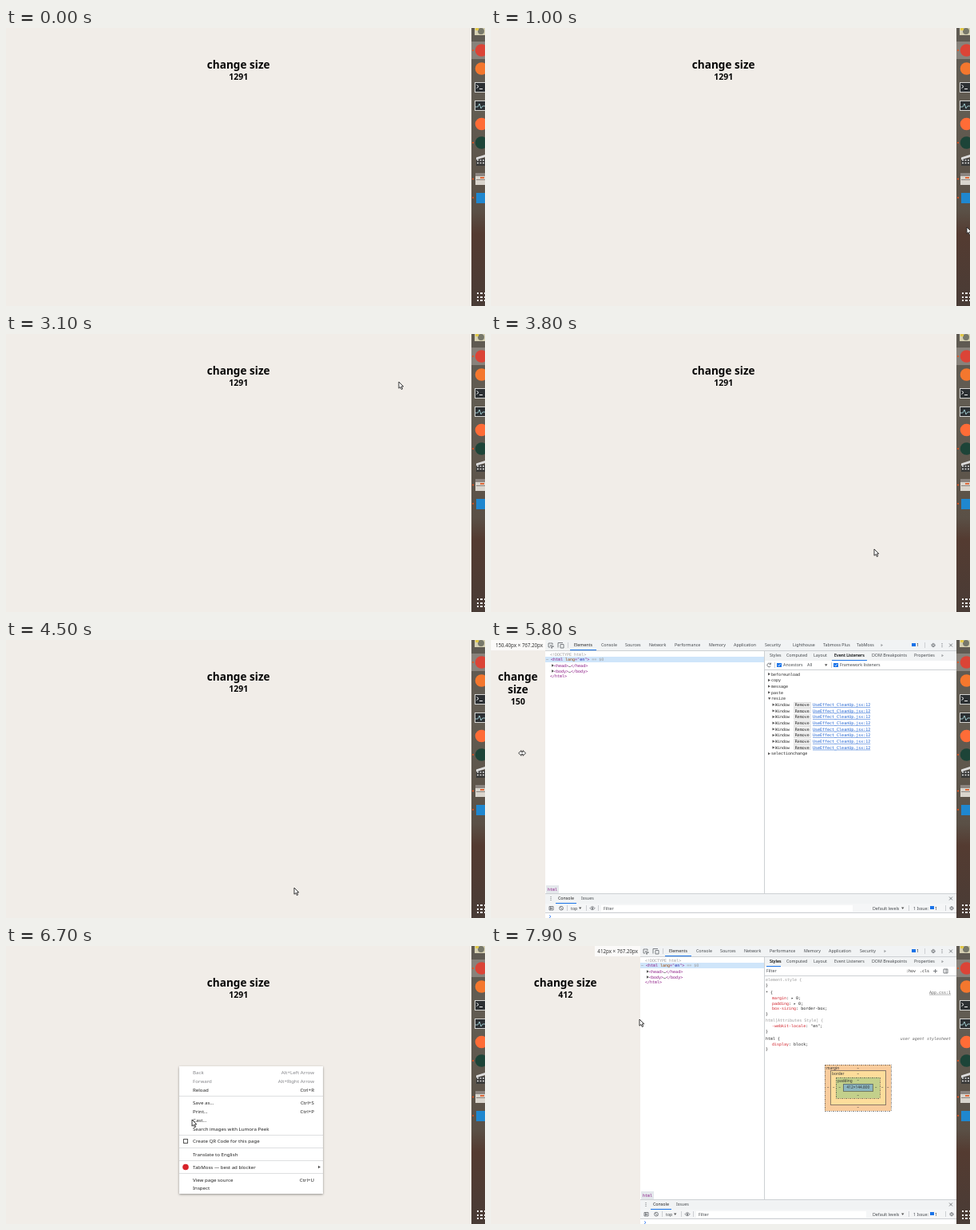
These frames come from a looping animation (600 px wide and 349 px high, 8 s). An HTML page:

```html
<!DOCTYPE html>
<html lang="en">
<head>
<meta charset="utf-8">
<title>change size</title>
<style>
html, body { margin: 0; width: 100%; height: 100%; overflow: hidden; background: #f1ede8; }
svg { display: block; width: 100%; height: 100%; }
text { font: 5.3px "Noto Sans", "Open Sans", sans-serif; fill: #44484c; white-space: pre; }
rect, line { shape-rendering: crispEdges; }
.head { font-size: 13.6px; font-weight: 700; fill: #050505; text-anchor: middle; }
.count { font-size: 10.5px; font-weight: 700; fill: #050505; text-anchor: middle; }
.size { font-size: 6.2px; fill: #333; text-anchor: end; }
.mono, .dim, .link, .agent { font: 5px "DejaVu Sans Mono", monospace; fill: #222; }
.dim { fill: #999; }
.agent { font-style: italic; fill: #666; text-anchor: end; }
.link { fill: #1a5fd0; text-decoration: underline; }
.tag { fill: #881280; }
.attr { fill: #994500; }
.val { fill: #1a1aa6; }
.prop { fill: #d0212a; }
.on { fill: #222; }
.menu { font-size: 6.15px; fill: #222; }
.off { font-size: 6.15px; fill: #85868a; }
.end { text-anchor: end; }
.box { font-size: 4.8px; fill: #333; }
.icon { fill: none; stroke: #5f6368; stroke-width: .8; }
</style>
</head>
<body>
<svg id="stage" viewBox="0 0 600 349" preserveAspectRatio="none"></svg>
<script>
const SCALE = 0.453, RIGHT = 583, FULL = 1291, DOCKED = 412, MIN = 150.4, LOOP = 8000;

// Text is placed by the middle of its capitals.
const txt = (x, y, s, cls = '') => `<text x="${x}" y="${y}" dy=".36em" class="${cls}">${s}</text>`;
const rect = (x, y, w, h, fill, more = '') => `<rect x="${x}" y="${y}" width="${w}" height="${h}" fill="${fill}" ${more}/>`;
const hline = (x, y, w, c = '#cdd0d3') => rect(x, y, w, .6, c);
const vline = (x, y, h, c = '#cdd0d3') => rect(x, y, .6, h, c);
const disc = (x, y, r, fill) => `<circle cx="${x}" cy="${y}" r="${r}" fill="${fill}"/>`;
const path = (d, more = 'class="icon"') => `<path d="${d}" ${more}/>`;
const span = (cls, s) => `<tspan class="${cls}">${s}</tspan>`;
const group = (id, s, more = '') => `<g id="${id}" ${more}>${s}</g>`;
const right = (x, y) => path(`M${x} ${y - 1.7}l3 1.7l-3 1.7z`, 'fill="#555"');
const down = (x, y) => path(`M${x} ${y - 1.2}h3.4l-1.7 2.6z`, 'fill="#555"');
const cross = (x, y) => path(`M${x - 2} ${y - 2}l4 4m0-4l-4 4`);
const dots = (x, y) => [-2, 0, 2].map(d => disc(x, y + d, .6, '#5f6368')).join('');
const gear = (x, y) => `<circle cx="${x}" cy="${y}" r="2.2" class="icon" stroke-dasharray="1.2 .5"/><circle cx="${x}" cy="${y}" r="1.4" class="icon"/>`;
const tick = (x, y) => rect(x - 2.6, y - 2.6, 5.2, 5.2, '#1a73e8', 'rx=".8"') +
  path(`M${x - 1.5} ${y}l1.2 1.3l2-2.7`, 'fill="none" stroke="#fff" stroke-width=".8"');
const bubble = (x, y) => rect(x, y - 2.3, 4.6, 4, '#1a73e8') + txt(x + 6, y, '1', 'on');

const tabs = [
  ['Elements', 36, 59], ['Console', 70, 90], ['Sources', 100, 120], ['Network', 130, 152],
  ['Performance', 162, 195], ['Memory', 205, 225], ['Application', 236, 265], ['Security', 275, 295],
  ['Lighthouse', 310, 338], ['Tabmoss Plus', 348, 380], ['TabMoss', 390, 410]
];

function leftPane() {
  const tag = (s, y) => right(8, y) + txt(11, y, `&lt;${s}&gt;${span('mono', '…')}&lt;/${s}&gt;`, 'mono tag');
  return rect(0, 0, 600, 349, '#fff') +
    rect(0, 0, 600, 13, '#f1f3f4') + hline(0, 13, 600) +
    path('M4 4h5v2M4 4v5h2M6.5 6.5l4 1.6l-1.8.6l-.6 1.8z') +
    path('M16 9.5v-6h6M19 5.5h4v4.5h-4z') + vline(28, 3, 7) +
    tabs.map(([s, x], i) => group('tab' + i, txt(x, 6.5, s, i ? '' : 'on'))).join('') +
    rect(31, 12, 33, 1, '#1a73e8') +
    txt(6, 18, '&lt;!DOCTYPE html&gt;', 'dim') +
    rect(0, 21, 600, 7, '#cfe5fa') + txt(.8, 24.5, '⋯', 'dim') +
    txt(7, 24.5, `&lt;html ${span('attr', 'lang')}="${span('val', 'en')}"&gt;${span('dim', ' == $0')}`, 'mono tag') +
    tag('head', 32) + tag('body', 39) + txt(6, 45.5, '&lt;/html&gt;', 'mono tag') +
    rect(0, 308, 600, 10, '#fff') + hline(0, 307.5, 600) +
    rect(1, 308, 16, 10, '#e4e8ec') + txt(3, 313, 'html', 'mono tag');
}

function drawerLeft() {
  return rect(0, 318, 600, 13, '#f1f3f4') + hline(0, 318, 600) + hline(0, 330.5, 600) +
    rect(0, 331, 600, 11, '#f5f6f7') + hline(0, 342, 600) + rect(0, 342.6, 600, 8, '#fff') +
    dots(7, 324.5) + txt(16, 324.5, 'Console', 'on') + rect(13, 330, 26, 1, '#1a73e8') + txt(45, 324.5, 'Issues') +
    path('M5 334.5h5v4.5h-5zM6.5 335.5l2.3 1.3l-2.3 1.3z') +
    `<circle cx="20" cy="336.7" r="2.4" class="icon"/>` + path('M18.3 335l3.4 3.4') +
    vline(27, 333, 7) + txt(32, 336.7, 'top') + down(42, 336.7) + vline(51, 333, 7) +
    path('M56 336.7q3-4 6 0q-3 4-6 0z') + disc(59, 336.7, 1, '#5f6368') + vline(66, 333, 7) +
    rect(70, 332.5, 315, 8.5, '#fff') + txt(73, 336.7, 'Filter') +
    path('M5 345.5l2 1.7l-2 1.7', 'fill="none" stroke="#367cf1" stroke-width=".9"');
}

function fixedTools() {
  return rect(521, 0, 62, 13, '#f1f3f4') + bubble(527, 6.5) + vline(543, 3, 7) +
    gear(554, 6.5) + dots(565, 6.5) + cross(576, 6.5);
}

function drawerRight() {
  return rect(470, 331.5, 113, 10, '#f5f6f7') + cross(576, 324.5) +
    txt(478, 336.7, 'Default levels') + down(514, 336.7) + vline(523, 333, 7) +
    txt(529, 336.7, '1 Issue:') + bubble(550, 336.7) + vline(569, 333, 7) + gear(577, 336.7);
}

const sideTabs = [['Styles', 349], ['Computed', 370], ['Layout', 404], ['Event Listeners', 430],
  ['DOM Breakpoints', 477], ['Properties', 530], ['»', 564]];

function sidebar() {
  return rect(342, 13.6, 241, 304.4, '#fff') + rect(342, 13.6, 241, 12, '#f1f3f4') +
    hline(342, 25.5, 241) + hline(342, 37, 241) + vline(342, 13.6, 304.4) +
    sideTabs.map(([s, x]) => txt(x, 19.5, s)).join('');
}

function listeners() {
  const rowY = i => 42.8 + 7.68 * i;
  const events = ['beforeunload', 'copy', 'message', 'paste', 'resize'];
  let s = rect(427, 25, 44, 1, '#1a73e8') + txt(430, 19.5, 'Event Listeners', 'on') +
    path('M350 30a2.3 2.3 0 1 0 .3 2.5M350.5 28.5v2h-2') + vline(355, 28, 7) +
    tick(361, 31.5) + txt(366, 31.5, 'Ancestors') + txt(396, 31.5, 'All') + down(418, 31.5) +
    vline(426, 28, 7) + tick(432, 31.5) + txt(437, 31.5, 'Framework listeners');
  events.forEach((e, i) => {
    s += (i === 4 ? down : right)(347, rowY(i)) + txt(351, rowY(i), e, 'mono');
  });
  for (let i = 5; i < 13; i++) {
    const y = rowY(i);
    s += right(352.5, y) + txt(356, y, 'Window', 'mono') +
      rect(379.5, y - 3, 20.5, 6, '#f2f2f2', 'stroke="#ccc" stroke-width=".5"') + txt(380.8, y, 'Remove', 'mono') +
      txt(403, y, 'UseEffect_CleanUp.jsx:12', 'link');
  }
  return s + right(347, rowY(13)) + txt(351, rowY(13), 'selectionchange', 'mono');
}

function styles() {
  const rule = (y, name, value) => txt(352, y, `${span('prop', name)}: ${value};`, 'mono');
  const layer = (x, y, w, h, fill, dash = '') =>
    rect(x, y, w, h, fill, `stroke="#444" stroke-width=".6" stroke-dasharray="${dash}"`);
  const dashes = [[160.5, 202.5], [168, 187]].flat();
  return rect(345, 25, 18, 1, '#1a73e8') + txt(349, 19.5, 'Styles', 'on') +
    txt(345, 31.5, 'Filter') + txt(520, 31.5, ':hov', 'mono') + txt(537, 31.5, '.cls', 'mono') +
    path('M554 31.5h5m-2.5-2.5v5M567 29h5v5h-5zM570 29v5') +
    txt(344, 42, 'element.style {', 'dim') + txt(344, 49, '}', 'mono') + hline(342, 52.5, 241) +
    txt(344, 58, '* {', 'mono') + `<text x="576" y="58" dy=".36em" class="agent" style="font-style:normal;text-decoration:underline">App.css:1</text>` +
    rule(65, 'margin', '▸ 0') + rule(72, 'padding', '▸ 0') + rule(78, 'box-sizing', 'border-box') +
    txt(344, 85, '}', 'mono') + hline(342, 88.5, 241) +
    `<g font-style="italic">${txt(344, 93, 'html[Attributes Style] {', 'dim')}` +
    rule(100, '-webkit-locale', '"en"') + txt(344, 107, '}', 'mono') + '</g>' + hline(342, 110.5, 241) +
    txt(344, 116, 'html {', 'mono') + txt(576, 116, 'user agent stylesheet', 'agent') +
    rule(123, 'display', 'block') + txt(344, 129, '}', 'mono') + hline(342, 133.5, 241) +
    layer(418, 149, 83, 58, '#f9cc9d', '1.5 1') + layer(425, 156.5, 69, 42.5, '#fddd9b') +
    layer(432, 165, 55, 26, '#c3d08b', '1.5 1') + layer(441, 173, 37, 9, '#8cb6c0') +
    txt(420, 153, 'margin', 'box') + txt(427, 160.5, 'border', 'box') + txt(434, 169, 'padding', 'box') +
    dashes.map(y => txt(458.5, y, '–', 'box')).join('') + txt(458.5, 153, '–', 'box') +
    [421, 428, 435.5, 481, 489, 496].map(x => txt(x, 177.5, '–', 'box')).join('') +
    txt(445.5, 177.5, '412×144.800', 'box');
}

function contextMenu() {
  const items = [[8, 'Back', 'Alt+Left Arrow'], [19, 'Forward', 'Alt+Right Arrow'], [30, 'Reload', 'Ctrl+R'],
    [46, 'Save as…', 'Ctrl+S'], [57, 'Print…', 'Ctrl+P'], [67.5, 'Cast…'], [78.5, 'Search images with Lumora Peek'],
    [94, 'Create QR Code for this page'], [110.5, 'Translate to English'], [126.5, 'TabMoss — best ad blocker'],
    [142.5, 'View page source', 'Ctrl+U'], [153, 'Inspect']];
  return rect(0, 0, 180, 159.5, '#fff', 'filter="url(#shade)"') +
    items.map(([y, s, key], i) => txt(17, y, s, i < 2 ? 'off' : 'menu') +
      (key ? txt(169, y, key, 'end ' + (i < 2 ? 'off' : 'menu')) : '')).join('') +
    [37, 86, 102, 118, 134].map(y => hline(0, y, 180, '#dedfe1')).join('') +
    rect(5.5, 91.5, 5, 5, 'none', 'stroke="#555" stroke-width="1"') + disc(8, 126.5, 3.8, '#d8232a') + right(174, 126.5);
}

function dock() {
  const terminal = y => rect(587, y - 6.5, 14, 13, '#d5d5d2') + rect(588.2, y - 5.2, 13, 10.4, '#2c3033');
  const white = 'fill="none" stroke="#eee" stroke-width="1"';
  let s = rect(RIGHT, 0, 17, 349, 'url(#wall)') + rect(RIGHT, 16.5, 17, 22, '#88827b') +
    rect(587, 0, 13, 9, '#d6d0b2') + disc(595, 4, 4, '#77786a') + rect(588, 0, 4, 3, '#e2c94a') +
    disc(595.5, 28, 7.8, '#db4437') + disc(595.5, 51, 7.8, '#f4772e') +
    terminal(74.5) + path('M589.5 71.5l2.5 2l-2.5 2M593 76.5h4', white) +
    terminal(97.5) + path('M588 99h3l2-4l2 6l2-3h4', 'fill="none" stroke="#9bc4c8" stroke-width="1"') +
    disc(595.5, 120.5, 7.8, '#ff6c37') + disc(595.5, 144, 7.8, '#1d4438') +
    rect(589, 164, 12, 9, '#3a3a39') + path('M589 162.5l11-3.5v3l-11 3.5z', 'fill="#ddd"') +
    path('M590 166h10M590 169.5h10', 'stroke="#ddd" stroke-width="1.4" stroke-dasharray="2 1.5"') +
    rect(588, 182, 13, 15, '#d9d5cd') + rect(588, 182, 13, 4, '#8c8580') + rect(589, 190, 12, .8, '#8c8580') + rect(594, 187, 5, 1.5, '#e06a3a') +
    rect(589, 207, 12, 13, '#1f87cf');
  for (const y of [28, 144, 189.5, 213]) s += disc(585, y, 1.1, '#e95420');
  for (let i = 0; i < 9; i++) s += rect(590 + 4.3 * (i % 3), 332 + 4.6 * Math.floor(i / 3), 2.2, 2.2, '#eee');
  return s;
}

const stage = document.getElementById('stage');
stage.innerHTML = `<defs>
  <linearGradient id="wall" x2="0" y2="1"><stop stop-color="#5f5a52"/><stop offset=".3" stop-color="#625c52"/>
  <stop offset=".66" stop-color="#5a5046"/><stop offset=".74" stop-color="#543b31"/><stop offset="1" stop-color="#493c36"/></linearGradient>
  <filter id="shade" x="-5%" y="-5%" width="110%" height="112%"><feDropShadow dx="0" dy="1" stdDeviation="1.6" flood-opacity=".4"/></filter>
  </defs>` + rect(0, 0, 600, 349, '#f1ede8') +
  '<text id="line1" y="51" class="head"></text><text id="line2" y="67" class="head">size</text><text id="count" class="count"></text>' +
  group('tools',
    group('label', rect(-57, 0, 57, 13, '#fbfaf9', 'id="labelBox"') + '<text id="size" x="-3" y="6.5" dy=".36em" class="size"></text>') +
    group('left', leftPane()) + txt(0, 6.5, '»', 'more') + fixedTools() + sidebar() +
    group('listeners', listeners()) + group('styles', styles()) + group('drawer', drawerLeft()) + drawerRight()) +
  group('menu', contextMenu()) + dock() +
  group('cursor',
    path('M0 0v8.2l1.9-1.7l1.4 3l1.4-.6l-1.4-3h2.5z', 'id="arrow" fill="#fff" stroke="#222" stroke-width=".9"') +
    path('M-4.5 0l3.5-3.3v2h2v-2l3.5 3.3l-3.5 3.3v-2h-2v2z', 'id="resizer" fill="#fff" stroke="#222" stroke-width=".9"'));

const el = id => document.getElementById(id);
const show = (id, on) => { el(id).style.display = on ? '' : 'none'; };
const move = (id, x, y = 0) => el(id).setAttribute('transform', `translate(${x} ${y})`);
const more = stage.querySelector('.more');

// Pointer route: time, x, y
const route = [[1000, 596, 250], [1300, 565, 210], [1600, 470, 70], [1900, 340, 215], [2100, 293, 241],
  [2500, 350, 190], [3100, 492, 60], [3500, 570, 195], [3800, 480, 270], [4000, 370, 180], [4200, 305, 100],
  [4400, 325, 305], [4500, 361, 311], [4700, 310, 151], [4900, 340, 303], [5000, 340, 303], [5200, 450, 20],
  [5300, 450, 20], [5500, 187, 142], [5800, 39, 142], [5900, 39, 142], [6200, 187, 142], [6400, 217, 151],
  [6500, 217, 151], [6700, 233, 218], [7000, 245, 303], [7300, 245, 303], [7900, 186, 92]];

function pointer(t) {
  const i = route.findIndex(p => p[0] > t);
  if (i < 0) return route[route.length - 1].slice(1);
  if (!i) return route[0].slice(1);
  const [t0, x0, y0] = route[i - 1], [t1, x1, y1] = route[i];
  const k = (t - t0) / (t1 - t0);
  return [x0 + (x1 - x0) * k, y0 + (y1 - y0) * k];
}

function draw(t) {
  const within = (a, b) => t >= a && t < b;
  const [x, y] = pointer(t);
  const drag = within(5500, 6300);
  const open = within(5000, 6300) || t >= 7100;
  const px = !open ? FULL : drag ? Math.min(DOCKED, Math.max(MIN, Math.round(x / SCALE / .8) * .8)) : DOCKED;
  const edge = open ? Math.round(px * SCALE) : RIGHT;
  const wrap = edge < 84;

  el('line1').textContent = wrap ? 'change' : 'change size';
  el('count').textContent = Math.floor(px + .001);
  el('count').setAttribute('y', wrap ? 81 : 64.5);
  for (const id of ['line1', 'line2', 'count']) el(id).setAttribute('x', edge / 2 - .3);
  show('line2', wrap);

  show('tools', open);
  if (open) {
    const whole = Math.abs(px - Math.round(px)) < .01;
    el('size').textContent = `${whole ? Math.round(px) : px.toFixed(2)}px × 767.20px`;
    el('labelBox').setAttribute('x', whole ? -57 : -68);
    el('labelBox').setAttribute('width', whole ? 57 : 68);
    for (const id of ['label', 'left', 'drawer']) move(id, edge);
    let last = 0;
    tabs.forEach((tab, i) => {
      const fits = edge + tab[2] < 485;
      show('tab' + i, fits);
      if (fits) last = tab[2];
    });
    more.setAttribute('x', edge + last + 10);
    const events = within(5300, 6300);
    show('listeners', events);
    show('styles', !events);
  }

  const first = within(4700, 5000);
  show('menu', first || within(6500, 7100));
  move('menu', first ? 310 : 217, 151);

  show('cursor', t >= 1000);
  move('cursor', x, y);
  show('arrow', !drag);
  show('resizer', drag);
}

const start = performance.now();
function tick100() {
  const t = (performance.now() - start) % LOOP;
  draw(Math.floor(t / 100) * 100);
  requestAnimationFrame(tick100);
}
tick100();
</script>
</body>
</html>
```
